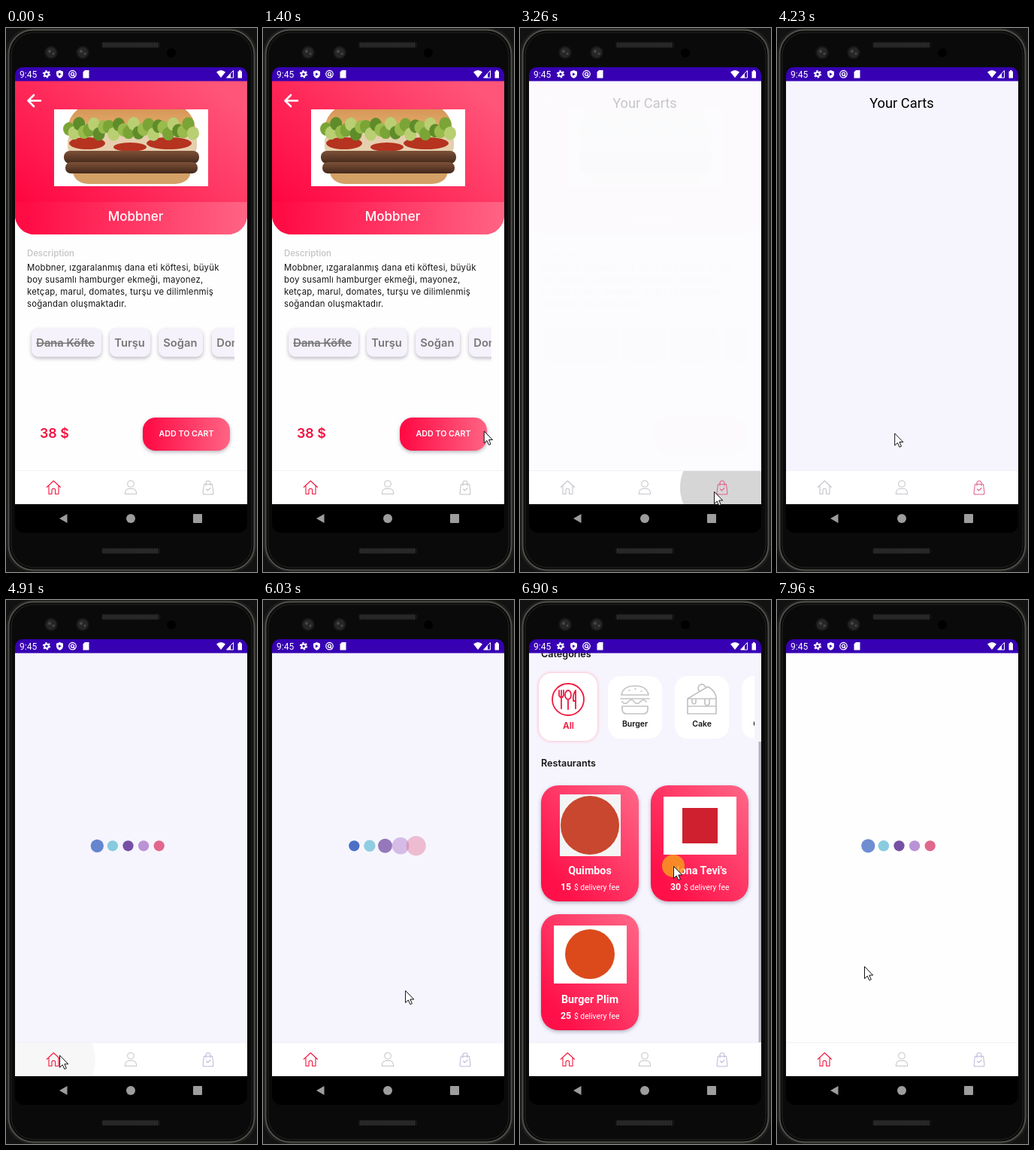
These frames come from a looping animation (334x722 px, 8 s). An HTML page:

```html
<!DOCTYPE html>
<html lang="en">
<head>
<meta charset="utf-8">
<title>Food order app</title>
<style>
html, body { margin: 0; width: 100%; height: 100%; overflow: hidden; background: #000; }
svg { display: block; width: 334px; height: 722px; font-family: Inter, sans-serif; }
.roboto { font-family: Roboto, sans-serif; }
.mid { text-anchor: middle; }
.semi { font-weight: 600; }
.bold { font-weight: 700; }
.line { fill: none; stroke-linecap: round; stroke-linejoin: round; }
.shadow { filter: drop-shadow(0 2.5px 2.5px rgba(50, 40, 70, .34)); }
.glow { filter: drop-shadow(0 0 2px #ffa9bb); }
.body { font-size: 11.4px; letter-spacing: .2px; }
.chip { font-size: 14.7px; font-weight: 600; fill: #777; }
</style>
</head>
<body>
<svg viewBox="0 0 334 722" xmlns="http://www.w3.org/2000/svg">
  <defs>
    <linearGradient id="head" x1="0" y1="1" x2="1" y2=".2">
      <stop offset=".1" stop-color="#ff0540"/><stop offset="1" stop-color="#ff5578"/>
    </linearGradient>
    <linearGradient id="bar" x1="0" x2="1">
      <stop offset=".05" stop-color="#ff0c45"/><stop offset="1" stop-color="#ff6484"/>
    </linearGradient>
    <linearGradient id="card" x1="0" y1="1" x2="1" y2="0">
      <stop offset=".15" stop-color="#ff1048"/><stop offset="1" stop-color="#ff6788"/>
    </linearGradient>
    <linearGradient id="bun" x1="0" y1="0" x2="0" y2="1">
      <stop offset="0" stop-color="#d08a4a"/><stop offset="1" stop-color="#e2ac6c"/>
    </linearGradient>
    <linearGradient id="patty" x1="0" y1="0" x2="0" y2="1">
      <stop offset="0" stop-color="#7d5138"/><stop offset="1" stop-color="#43281b"/>
    </linearGradient>
    <clipPath id="view"><rect x="12" y="70" width="309" height="518"/></clipPath>
    <clipPath id="headShape"><path d="M12 70H321V248a26 26 0 0 1-26 26H38a26 26 0 0 1-26-26Z"/></clipPath>
    <clipPath id="photo"><rect x="64" y="108" width="205" height="102"/></clipPath>
    <clipPath id="chipRow"><rect x="28" y="390" width="276" height="60"/></clipPath>
    <clipPath id="catRow"><rect x="12" y="85" width="300" height="115"/></clipPath>
    <clipPath id="tabs"><rect x="12" y="588" width="309" height="44"/></clipPath>
  </defs>

  <!-- phone body -->
  <rect width="334" height="722" fill="#121212"/>
  <rect width="334" height="722" rx="34" fill="#1d1d1b"/>
  <rect x="3.500" y="2.500" width="327" height="717" rx="33" fill="#0b0b0b" stroke="#4f4f4b" stroke-width="2"/>
  <rect x="7" y="6" width="320" height="710" rx="30" fill="#0a0a0a" stroke="#242422"/>
  <g fill="#161616">
    <rect x="127" y="18.500" width="78" height="8" rx="3"/>
    <rect x="127" y="690" width="78" height="8" rx="3"/>
  </g>
  <path d="M129 22.500H203M129 694H203" stroke="#383838" stroke-width="6" stroke-dasharray="1 1"/>
  <g fill="#262626" stroke="#151515" stroke-width="2">
    <circle cx="60" cy="32.500" r="8"/><circle cx="102" cy="32.500" r="8"/>
  </g>
  <g fill="#484848"><circle cx="58" cy="31" r="2"/><circle cx="63" cy="34" r="1.500"/><circle cx="100" cy="31" r="2"/><circle cx="105" cy="34" r="1.500"/></g>
  <circle cx="220" cy="33" r="6" fill="#000"/>
  <rect x="12" y="52" width="309" height="618" rx="12" fill="#000"/>

  <rect x="12" y="70" width="309" height="562" fill="#fefefe"/>
  <g clip-path="url(#view)">
    <rect id="lilac" x="12" y="70" width="309" height="518" fill="#f6f5fe"/>

    <g id="detail">
      <rect x="12" y="70" width="309" height="518" fill="#fefefe"/>
      <g clip-path="url(#headShape)">
        <rect x="12" y="70" width="309" height="204" fill="url(#head)"/>
        <rect x="12" y="231" width="309" height="43" fill="url(#bar)"/>
      </g>
      <path class="line" d="M46 96.500H29.500M37 89L29.500 96.500L37 104" stroke="#fff" stroke-width="2.600"/>
      <g clip-path="url(#photo)">
        <rect x="64" y="108" width="205" height="102" fill="#fff"/>
        <path d="M82 134Q84 92 167 92T252 134Z" fill="url(#bun)"/>
        <path d="M88 184H246Q248 206 224 207H110Q88 206 88 184Z" fill="#d3a066"/>
        <rect x="82" y="140" width="172" height="28" rx="10" fill="#e5cfae"/>
        <g fill="#b5331f">
          <ellipse cx="108" cy="153" rx="24" ry="8"/><ellipse cx="165" cy="158" rx="22" ry="6"/><ellipse cx="217" cy="153" rx="30" ry="8"/>
        </g>
        <rect x="77" y="163" width="180" height="17" rx="8" fill="url(#patty)"/>
        <rect x="79" y="178" width="176" height="15" rx="7" fill="url(#patty)"/>
        <g id="lettuce"></g>
      </g>
      <text class="mid" x="172.500" y="256" font-size="17" font-weight="500" fill="#fff">Mobbner</text>
      <text class="semi" x="28" y="303" font-size="11.300" fill="#c9c9c9">Description</text>
      <g class="body" fill="#151515">
        <text x="28" y="322">Mobbner, ızgaralanmış dana eti köftesi, büyük</text>
        <text x="28" y="338">boy susamlı hamburger ekmeği, mayonez,</text>
        <text x="28" y="353.500">ketçap, marul, domates, turşu ve dilimlenmiş</text>
        <text x="28" y="369.500">soğandan oluşmaktadır.</text>
      </g>
      <g id="chips" clip-path="url(#chipRow)"></g>
      <text class="semi" x="45" y="544" font-size="17.800" fill="#f3103f">38 $</text>
      <rect class="shadow" x="182" y="517" width="116" height="44" rx="17" fill="url(#bar)"/>
      <text class="mid semi" x="240" y="542" font-size="10.700" fill="#fff">ADD TO CART</text>
    </g>

    <text id="cart" class="roboto mid" x="166" y="106" font-size="18.300">Your Carts</text>

    <g id="home">
      <g id="list">
        <g class="semi" font-size="12.600" fill="#141414">
          <text x="28" y="76">Categories</text><text x="28" y="221">Restaurants</text>
        </g>
        <g id="cats" clip-path="url(#catRow)"></g>
        <g id="shops"></g>
      </g>
      <rect id="thumb" x="317.500" width="3.500" height="400" fill="#b5b4bd"/>
    </g>
    <g id="loader"></g>
  </g>

  <!-- status bar -->
  <path d="M12 70.500V62a10 10 0 0 1 10-10H311a10 10 0 0 1 10 10V70.500Z" fill="#3700b3"/>
  <g fill="#fff">
    <text class="roboto" x="18" y="66" font-size="12">9:45</text>
    <path d="M71.500 56L76 57.700V61q0 4-4.500 5.700q-4.500-1.700-4.500-5.700V57.700Z"/>
    <path d="M105 56h5.500V66.500H102.500V58.500Z"/>
    <path d="M280 58.500Q286 53.500 292 58.500L286 66Z"/>
    <path d="M308.500 57.500h1.500v-1.500h2.500v1.500h1.500V66.500h-5.500Z"/>
    <path d="M302.500 56.500V66H293.500Z" fill="none" stroke="#fff"/>
    <path d="M299 60V66h-5Z"/>
  </g>
  <path d="M70 59.200L73.700 61.300L70 63.500Z" fill="#3700b3"/>
  <g fill="none" stroke="#fff">
    <circle cx="54" cy="61.200" r="2.700" stroke-width="2"/>
    <circle cx="54" cy="61.200" r="4.300" stroke-width="1.800" stroke-dasharray="2.250 2.250"/>
    <circle cx="88.500" cy="61.200" r="4.700" stroke-width="1.300"/>
    <circle cx="88.500" cy="61.200" r="2" stroke-width="1.300"/>
    <path d="M89 62L92 65" stroke-width="1.300"/>
  </g>

  <!-- bottom tabs -->
  <rect x="12" y="587" width="309" height="45" fill="#fff"/>
  <path d="M12 587.500H321" stroke="#f1f0f5"/>
  <g clip-path="url(#tabs)">
    <circle id="cartRipple" cx="269" cy="610"/><circle id="homeRipple" cx="63" cy="610"/>
  </g>
  <g class="line" stroke-width="1.100">
    <path id="homeIcon" d="M57 608V618.500H61V613.500a2.300 2.300 0 0 1 4.600 0V618.500H70V608M54.300 609.500L63.300 601L72.500 609.500"/>
    <path stroke="#c6c4ca" d="M170.300 605a4.300 4.300 0 1 1-8.600 0a4.300 4.300 0 1 1 8.600 0ZM163 611.500H169Q173.500 612 173.700 618.500H158.300Q158.500 612 163 611.500Z"/>
    <path id="bagIcon" d="M263.500 605.500H274.500L276 617Q276 619 274 619H264Q262 619 262 617ZM266 607.500V604a3 3 0 0 1 6 0V607.500M266.500 612L268.500 614L272 610.500"/>
  </g>

  <!-- system buttons -->
  <g fill="#9d9d9d">
    <path d="M81.500 645V657L71 651Z"/><circle cx="166" cy="651" r="6"/><rect x="249" y="645" width="12" height="12" rx="1"/>
  </g>

  <circle id="touch" r="15" fill="#f7a21c" opacity=".8"/>
  <path id="cursor" d="M.5 .5V16.500L4.200 13L6.800 18.700L9.300 17.600L6.800 12H11.700Z" fill="#fff" stroke="#111"/>
</svg>

<script>
const $ = id => document.getElementById(id);
const LOOP = 8000, MAX_SCROLL = 153, SLOP = 12, DRAG_Y = 518;
const RED = '#f0193f', PINK = '#e4638a', GREY = '#c6c4ca', MAUVE = '#c0bcdc';

// Rows of [time, value, ...], linear in between.
const path = [
  [1260, 307, 535], [1600, 275, 534], [2020, 249, 530], [2100, 249, 530],
  [2400, 238, 523], [2520, 238, 523], [2850, 259, 613], [2980, 259, 613],
  [3260, 258, 615], [3800, 256, 615], [4050, 215, 562], [4250, 150, 535],
  [4450, 75, 590], [4570, 60, 603], [4680, 71, 604], [4910, 71, 604],
  [5120, 83, 580], [5400, 100, 556], [5470, 100, 556], [6030, 189, 518],
  [6100, 195, 518], [6430, 195, 518], [6880, 204, 353], [7180, 204, 352],
  [7250, 204, 352], [7530, 116, 486]
];
const fades = {
  detail: [[2980, 1], [3250, .004], [3400, 0]],
  lilac: [[3050, 0], [3260, .2], [3540, 1], [7670, 1], [7930, 0]],
  cart: [[3050, 0], [3260, .2], [3540, 1], [4640, 1], [4780, 0]],
  home: [[6100, 0], [6101, 1], [7670, 1], [7930, .006], [8000, 0]],
  thumb: [[6430, 0], [6500, 1], [7250, 1], [7530, 0]]
};
const ripples = {
  cartRipple: { size: [[2980, 10], [3260, 56]], alpha: [[2980, 0], [3050, .16], [3300, .16], [3700, 0]] },
  homeRipple: { size: [[4640, 10], [4850, 56]], alpha: [[4640, 0], [4700, .16], [4780, .16], [4900, .035], [5000, 0]] }
};

function at(rows, t) {
  const i = rows.findIndex(r => r[0] > t);
  if (i === 0) return rows[0].slice(1);
  if (i < 0) return rows[rows.length - 1].slice(1);
  const a = rows[i - 1], b = rows[i], k = (t - a[0]) / (b[0] - a[0]);
  return a.slice(1).map((v, j) => v + (b[j + 1] - v) * k);
}

function buildDetail() {
  const greens = ['#7aa536', '#b9cf72', '#5f8c2a', '#98bb4c'];
  $('lettuce').innerHTML = Array.from({ length: 26 }, (_, i) => `
    <ellipse cx="${84 + i * 6.6}" cy="${134 + 7 * Math.sin(i * 2.3)}" rx="8" ry="9" fill="${greens[i % 4]}"/>`).join('');

  const chips = [['Dana Köfte', 34, 93], ['Turşu', 138, 54], ['Soğan', 203, 59], ['Domates', 274, 78]];
  $('chips').innerHTML = chips.map(([name, x, w], i) => `
    <rect class="shadow" x="${x}" y="399" width="${w}" height="37.500" rx="9" fill="#f5f2fc"/>
    <text class="chip" x="${x + 6.3}" y="423"${i ? '' : ' text-decoration="line-through"'}>${name}</text>`).join('');
}

function buildHome() {
  const burger = `M135 126Q137 114 153 114T171 126ZM134 131H172M136 135q4 5 8 0t8 0t8 0t8 0
    M136 141H170V145Q170 151 164 151H142Q136 151 136 145ZM145 120h1M153 118h1M161 121h1`;
  const cake = `M223 131L250 115Q261 121 261 131ZM223 131V151H261V131M223 141H261
    M229 131v5q3 4 5 0v-5M246 131v7q3 4 6 0v-7M239 121a5 5 0 1 1 8-4`;
  const cutlery = `M64 120a4 6 0 0 1 0 12a4 6 0 0 1 0-12M64 132V145M52 120V127Q55 132 58 127V120M55 120V144
    M74 144V120Q70 125 71 134H74`;
  const cats = [['Burger', 117, burger], ['Cake', 206, cake], ['Chicken', 295, '']];
  $('cats').innerHTML = `
    <rect class="glow" x="25" y="97" width="78" height="90" rx="17" fill="#fff"/>
    <g class="line" stroke="${RED}" stroke-width="1.800"><circle cx="64" cy="132" r="21"/><path d="${cutlery}"/></g>
    <text class="mid semi" x="64.500" y="171" font-size="12" fill="${RED}">All</text>` +
    cats.map(([name, x, icon]) => `
    <rect x="${x}" y="101" width="72" height="83" rx="17" fill="#fff"/>
    <path class="line" d="${icon}" stroke="#c3c3c6" stroke-width="1.700"/>
    <text class="mid semi" x="${x + 36}" y="168" font-size="10.500" fill="#141414">${name}</text>`).join('');

  const shops = [
    { name: 'Quimbos', fee: 15, x: 28, y: 246, pic: [25, 12, 81, 82], mark: '<circle cx="65" cy="53" r="39" fill="#c8472e"/>', back: '#f4f4f4' },
    { name: "Nona Tevi's", fee: 30, x: 174, y: 246, pic: [17, 15, 97, 77], mark: '<rect x="42" y="30" width="47" height="47" fill="#cf2030"/>', back: '#fff' },
    { name: 'Burger Plim', fee: 25, x: 28, y: 417, pic: [17, 15, 97, 77], mark: '<circle cx="65" cy="53" r="33" fill="#dc4a1c"/>', back: '#fff' }
  ];
  $('shops').innerHTML = shops.map(s => `
    <g transform="translate(${s.x} ${s.y})">
      <rect class="shadow" width="130" height="154" rx="23" fill="url(#card)"/>
      <rect x="${s.pic[0]}" y="${s.pic[1]}" width="${s.pic[2]}" height="${s.pic[3]}" fill="${s.back}"/>${s.mark}
      <g class="roboto" fill="#fff">
        <text class="mid bold" x="65" y="117.500" font-size="14.300">${s.name}</text>
        <text class="bold" x="26" y="138.500" font-size="12.300">${s.fee}</text>
        <text x="44" y="138.500" font-size="10.300">$ delivery fee</text>
      </g>
    </g>`).join('');
}

const dots = ['#4b70c6', '#88cade', '#7650a4', '#bb92d5', '#e0688c'].map((fill, i) => {
  const c = document.createElementNS('http://www.w3.org/2000/svg', 'circle');
  c.setAttribute('cx', 121.3 + i * 20.6);
  c.setAttribute('cy', 326.3);
  c.setAttribute('fill', fill);
  $('loader').append(c);
  return c;
});

// A pulse runs along the row: each dot swells and thins out, then returns.
function drawLoader(t) {
  const start = t < 7000 ? 4766 : 7770, half = 574;
  const shown = (t >= 4740 && t < 6100) || t >= 7740;
  $('loader').style.display = shown ? '' : 'none';
  dots.forEach((dot, i) => {
    const p = (t - start - i * half * .3) / half;
    const k = Math.max(0, 1 - Math.abs(p - 1));
    dot.setAttribute('r', 7.1 + 6 * k);
    dot.setAttribute('opacity', 1 - .6 * k);
  });
}

function draw(t) {
  for (const id in fades) $(id).style.opacity = at(fades[id], t)[0];
  for (const id in ripples) {
    $(id).setAttribute('r', at(ripples[id].size, t)[0]);
    $(id).setAttribute('opacity', at(ripples[id].alpha, t)[0]);
  }
  const inCart = t >= 3050 && t < 4660;
  $('homeIcon').setAttribute('stroke', inCart ? GREY : RED);
  $('bagIcon').setAttribute('stroke', inCart ? PINK : t < 3050 ? GREY : MAUVE);

  const [x, y] = at(path, t);
  $('cursor').setAttribute('transform', `translate(${x} ${y})`);
  $('cursor').style.display = t < 1260 ? 'none' : '';
  $('touch').setAttribute('transform', `translate(${x} ${y})`);
  $('touch').style.display = t >= 6430 && t < 7180 ? '' : 'none';

  const drag = Math.max(0, Math.min(MAX_SCROLL, DRAG_Y - y - SLOP));
  const scroll = t < 6430 ? 0 : t < 7180 ? drag : MAX_SCROLL;
  $('list').setAttribute('transform', `translate(0 ${MAX_SCROLL - scroll})`);
  $('thumb').setAttribute('y', 70 + scroll / MAX_SCROLL * 118);
  drawLoader(t);
}

function tick() {
  draw(performance.now() % LOOP);
  requestAnimationFrame(tick);
}

buildDetail();
buildHome();
tick();
</script>
</body>
</html>
```
